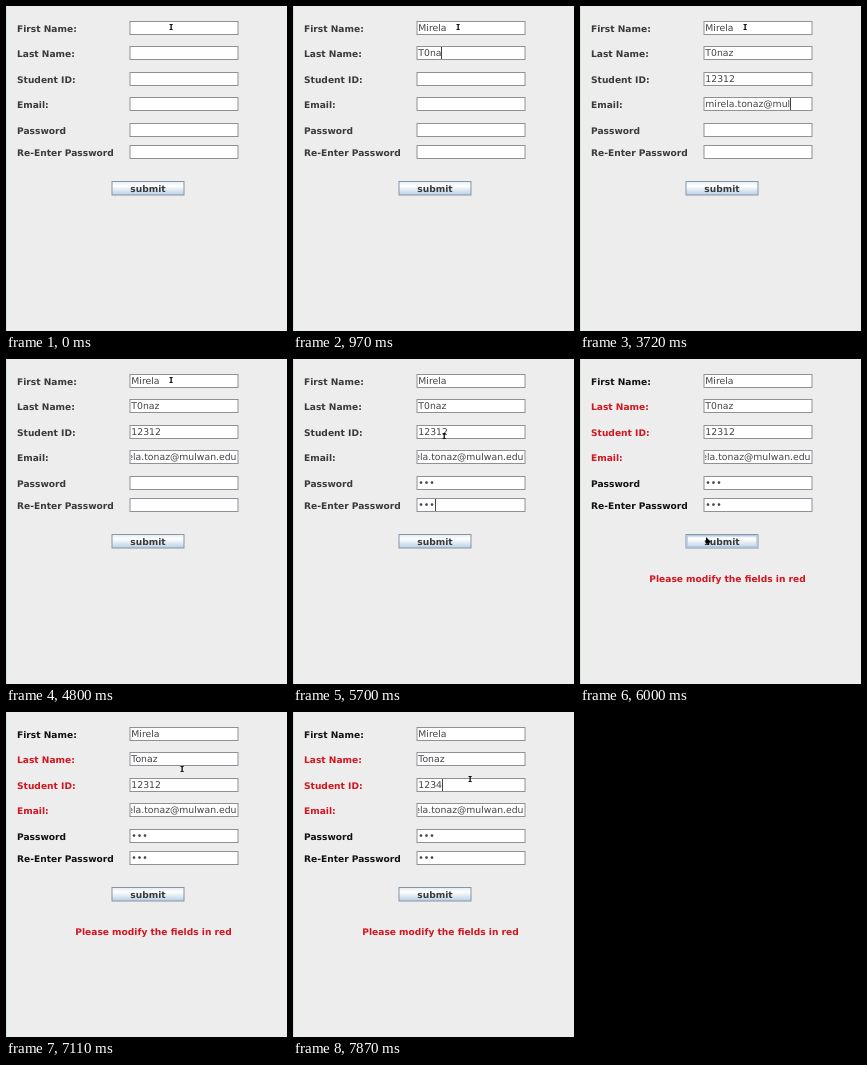
Write an HTML page with a canvas that moves like this. It is 281 px wide and 325 px high and loops after 8 s.

```html
<!DOCTYPE html>
<html lang="en">
<head>
<meta charset="utf-8">
<title>Form</title>
<style>
  html, body { margin: 0; width: 100%; height: 100%; overflow: hidden; background: #eeedee; }
  canvas { display: block; width: 281px; height: 325px; }
</style>
</head>
<body>
<canvas id="stage" width="281" height="325"></canvas>
<script>
const ctx = document.getElementById('stage').getContext('2d');
const LOOP = 8000, SUBMITTED = 5930;
const PLAIN = '9.3px "DejaVu Sans", sans-serif';
const BOLD = 'bold 9.1px "DejaVu Sans", sans-serif';
const INK = '#3a3a3a', DARK = '#111', RED = '#d2161f';
const FIELD = { x: 124, w: 108, h: 13 };
const ROW_GAP = 25.4;
const CARET_LEAD = 120, CARET_LINGER = 180;

// A run of keystrokes: the text before the caret after each key, then the text behind it
const edit = (states, start, step, tail = '') =>
  ({ states, start, step, tail, end: start + step * (states.length - 1) });
const type = (text, start, step) =>
  edit([...text].map((_, i) => text.slice(0, i + 1)), start, step);

const rows = [
  { label: 'First Name:', edits: [type('Mirela', 140, 84)] },
  { label: 'Last Name:', invalid: true,
    edits: [type('T0naz', 680, 90), edit(['T', 'To'], 6760, 140, 'naz')] },
  { label: 'Student ID:', invalid: true,
    edits: [type('12312', 1430, 65), edit(['1231', '123', '1234'], 7640, 115)] },
  { label: 'Email:', invalid: true, edits: [type('mirela.tonaz@mulwan.edu', 2190, 96)] },
  { label: 'Password', edits: [type('•••', 4940, 85)] },
  { label: 'Re-Enter Password', edits: [type('•••', 5390, 80)] }
];
rows.forEach((row, i) => row.top = Math.round(15 + ROW_GAP * i));
rows[5].top -= 3;

const home = { x: 165, y: 21 };
const MOVE_TIME = 300;
const moves = [
  { at: 5580, x: 126, y: 178 },
  { at: 6220, x: 172, y: 49 },
  { at: 6800, x: 176, y: 57 },
  { at: 7200, x: 177, y: 67 }
];

const ease = u => u * u * (3 - 2 * u);
const clamp = u => Math.max(0, Math.min(1, u));

function pointerAt(t) {
  let { x, y } = home;
  for (const move of moves) {
    const u = ease(clamp((t - move.at) / MOVE_TIME));
    x += (move.x - x) * u;
    y += (move.y - y) * u;
  }
  return { x, y };
}

function contentAt(row, t) {
  let value = '', caret = -1;
  for (const { states, start, step, tail, end } of row.edits) {
    if (t >= start) {
      const key = Math.min(states.length - 1, Math.floor((t - start) / step));
      value = states[key] + tail;
    }
    if (t >= start - CARET_LEAD && t < end + CARET_LINGER) caret = value.length - tail.length;
  }
  return { value, caret };
}

function write(text, x, y, font, color, align = 'left') {
  ctx.font = font;
  ctx.fillStyle = color;
  ctx.textAlign = align;
  ctx.fillText(text, x, y);
}

function box(x, y, w, h, fill, stroke) {
  ctx.fillStyle = fill;
  ctx.fillRect(x, y, w, h);
  ctx.strokeStyle = stroke;
  ctx.lineWidth = 1;
  ctx.strokeRect(x, y, w, h);
}

function drawRow(row, t) {
  const { label, top, invalid } = row;
  const color = t < SUBMITTED ? INK : invalid ? RED : DARK;
  write(label, 11, top + 10.5, BOLD, color);
  box(FIELD.x, top + 0.5, FIELD.w, FIELD.h, '#fff', '#8e9195');

  const { value, caret } = contentAt(row, t);
  ctx.font = PLAIN;
  const left = Math.min(125.3, 230.5 - ctx.measureText(value).width);
  ctx.save();
  ctx.beginPath();
  ctx.rect(125, top + 1, 106, 12);
  ctx.clip();
  write(value, left, top + 10.4, PLAIN, '#444');
  if (caret >= 0) {
    const x = left + ctx.measureText(value.slice(0, caret)).width;
    ctx.fillRect(Math.min(230, Math.round(x)), top + 1, 1, 12);
  }
  ctx.restore();
}

function drawButton(hover) {
  const shade = ctx.createLinearGradient(0, 175, 0, 189);
  shade.addColorStop(0, '#dfe8f1');
  shade.addColorStop(0.35, '#fff');
  shade.addColorStop(1, '#b8cfe5');
  box(106, 175.5, 72, 13.5, shade, '#8796a5');
  if (hover) {
    ctx.strokeStyle = '#b3cae0';
    ctx.lineWidth = 1.5;
    ctx.strokeRect(107, 176.7, 70, 11);
  }
  write('submit', 142, 186, BOLD, INK, 'center');
}

function drawIBeam(x, y) {
  ctx.fillStyle = '#111';
  ctx.fillRect(x - 0.5, y - 3, 1.3, 6);
  ctx.fillRect(x - 1.5, y - 3, 3.2, 1);
  ctx.fillRect(x - 1.5, y + 2, 3.2, 1);
}

function drawArrow(x, y) {
  ctx.fillStyle = '#000';
  ctx.beginPath();
  ctx.moveTo(x, y);
  ctx.lineTo(x, y + 7);
  ctx.lineTo(x + 5, y + 5);
  ctx.fill();
  ctx.fillRect(x + 1.6, y + 5, 1.6, 3);
}

function draw(t) {
  ctx.fillStyle = '#eeedee';
  ctx.fillRect(0, 0, 281, 325);
  ctx.fillStyle = '#cfe6d0';
  ctx.fillRect(0, 0, 1, 325);

  const { x, y } = pointerAt(t);
  const overButton = x > 105 && x < 179 && y > 174 && y < 190;
  rows.forEach(row => drawRow(row, t));
  drawButton(overButton);
  if (t >= SUBMITTED) write('Please modify the fields in red', 147.5, 222.5, BOLD, RED, 'center');
  (y < 100 ? drawIBeam : drawArrow)(x, y);
}

ctx.textRendering = 'geometricPrecision';
function tick() {
  draw(performance.now() % LOOP);
  requestAnimationFrame(tick);
}
tick();
</script>
</body>
</html>
```
